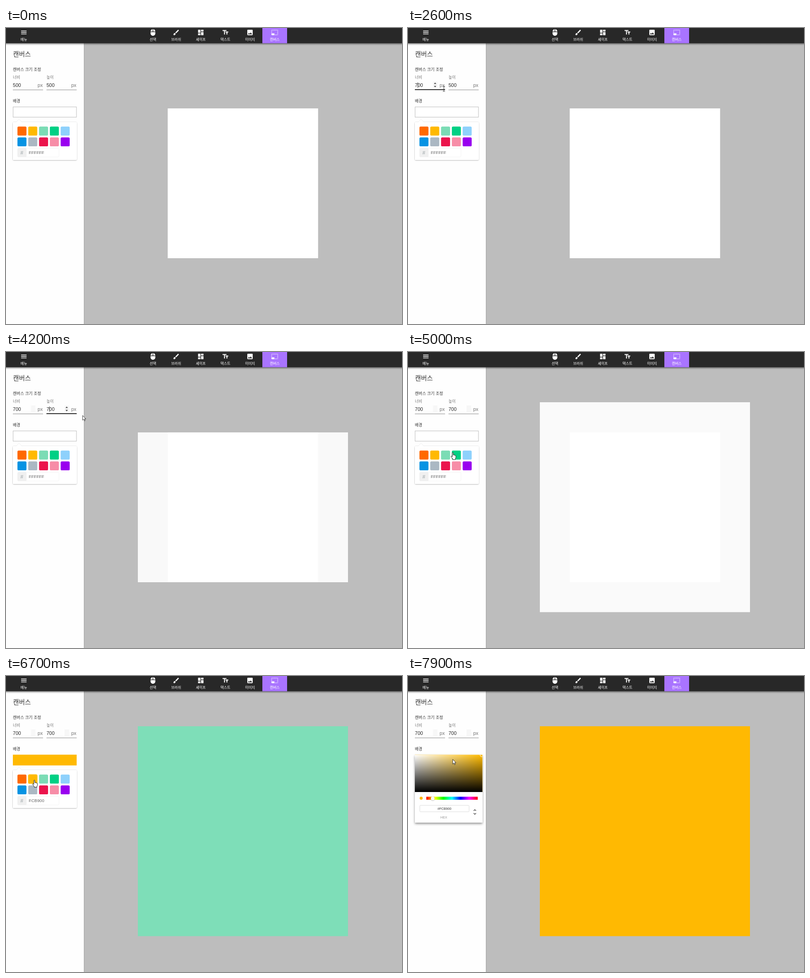
An HTML page that plays this animation: 865 px wide and 648 px high, repeating every 8000 ms.

```html
<!DOCTYPE html>
<html lang="ko">
<head>
<meta charset="utf-8">
<style>
  html, body { margin: 0; width: 100%; height: 100%; overflow: hidden; background: #bdbdbd; }
  svg { display: block; width: 865px; height: 648px; }
  text { font-family: "Liberation Sans", Arial, sans-serif; }
  .ko { font-family: "Noto Sans CJK KR", "Noto Sans CJK", sans-serif; }
</style>
</head>
<body>
<svg id="stage" viewBox="0 0 865 648" xmlns="http://www.w3.org/2000/svg"></svg>
<script>
const LOOP = 8000, STEP = 100;
const MINT = '#7edeb8', GOLD = '#ffb902';

const tools = [
  [39, '메뉴', 'M3 18h18v-2H3v2zm0-5h18v-2H3v2zm0-7v2h18V6H3z'],
  [321, '선택', 'M13 1.07V9h7c0-4.08-3.05-7.44-7-7.93zM4 15c0 4.42 3.58 8 8 8s8-3.58 8-8v-4H4v4zm7-13.93C7.05 1.56 4 4.92 4 9h7V1.07z'],
  [371.7, '브러쉬', 'M7 14c-1.66 0-3 1.34-3 3 0 1.31-1.16 2-2 2 .92 1.22 2.49 2 4 2 2.21 0 4-1.79 4-4 0-1.66-1.34-3-3-3zm13.71-9.37l-1.34-1.34c-.39-.39-1.02-.39-1.41 0L9 12.25 11.75 15l8.96-8.96c.39-.39.39-1.02 0-1.41z'],
  [425.5, '셰이프', 'M3 13h8V3H3v10zm0 8h8v-6H3v6zm10 0h8V11h-8v10zm0-18v6h8V3h-8z'],
  [479.3, '택스트', 'M2.5 4v3h5v12h3V7h5V4h-13zm19 5h-9v3h3v7h3v-7h3V9z'],
  [533, '이미지', 'M21 19V5c0-1.1-.9-2-2-2H5c-1.1 0-2 .9-2 2v14c0 1.1.9 2 2 2h14c1.1 0 2-.9 2-2zM8.5 13.5l2.5 3.01L14.5 12l4.5 6H5l3.5-4.5z'],
  [587, '캔버스', 'M23 15h-2v2h2v-2zm0-4h-2v2h2v-2zm0 8h-2v2c1 0 2-1 2-2zM15 3h-2v2h2V3zm8 4h-2v2h2V7zm-2-4v2h2c0-1-1-2-2-2zM3 21h8v-6H1v4c0 1.1.9 2 2 2zM3 7H1v2h2V7zm12 12h-2v2h2v-2zm4-16h-2v2h2V3zm0 16h-2v2h2v-2zM3 3C2 3 1 4 1 5h2V3zm0 8H1v2h2v-2zm8-8H9v2h2V3zM7 3H5v2h2V3z']
];
const swatches = ['#ff6900', GOLD, '#7bdcb5', '#00d084', '#8ed1fc',
                  '#0693e3', '#abb8c3', '#eb144c', '#f78da7', '#9900ef'];

const rect = (x, y, w, h, fill, more = '') =>
  `<rect x="${x}" y="${y}" width="${w}" height="${h}" fill="${fill}" ${more}/>`;
const text = (x, y, size, fill, s, more = '') =>
  `<text x="${x}" y="${y}" font-size="${size}" fill="${fill}" ${more}>${s}</text>`;
const ko = (x, y, size, fill, s, more = '') => text(x, y, size, fill, s, 'class="ko" ' + more);
const stops = list => list.map((c, i) =>
  `<stop offset="${i / (list.length - 1)}" stop-color="${c}"/>`).join('');

function header() {
  return rect(0, 33, 865, 5, 'url(#drop)') + rect(0, 0, 865, 33.4, '#282828') +
    rect(560, 0, 54, 33.4, '#a974ff') +
    tools.map(([x, name, d]) =>
      `<path d="${d}" fill="#fff" transform="translate(${x - 7.9} 1.9) scale(.656)"/>` +
      ko(x, 28, 7.8, '#fff', name, 'text-anchor="middle" font-weight="500"')).join('');
}

function field(id, x, label) {
  return ko(x, 111.4, 8.6, '#777', label) +
    text(x, 129, 10.6, '#2c2c2c', '500', `id="${id}Text"`) +
    text(x + 54, 129, 10.6, '#757575', 'px') +
    rect(x, 135, 66, 1, '#8c8c8c') +
    rect(x, 134, 66, 1.7, '#222', `id="${id}Line"`) +
    rect(x + 39.5, 117, 10, 15, '#f7f7f7', `id="${id}Spin"`) +
    `<path id="${id}Arrows" d="M${x + 41.5} 122.6h5.4l-2.7-3zM${x + 41.5} 126.8h5.4l-2.7 3z" fill="#444"/>` +
    rect(x + 6.2, 119, .8, 12, '#222', `id="${id}Caret"`);
}

function palette() {
  const tiles = swatches.map((c, i) => {
    const x = 25 + i % 5 * 23.6, y = 215.8 + (i > 4) * 23.6;
    return rect(x, y, 19.7, 19.7, c, `id="glow${i}" rx="2.6" filter="url(#glow)"`) +
      rect(x, y, 19.7, 19.7, c, 'rx="2.6"');
  }).join('');
  return `<g id="palette">
    ${rect(15, 206, 139.5, 83, '#fff', 'rx="2.6" filter="url(#soft)"')}
    <path d="M22.5 206l6-6.5 6 6.5" fill="#fff" stroke="#e8e8e8" stroke-width=".7"/>
    ${rect(15, 206, 139.5, 83, '#fff', 'rx="2.6"')}${tiles}
    ${rect(25.3, 263.3, 90.5, 19, '#fff', 'rx="2.6" stroke="#f2f2f2" stroke-width=".8"')}
    ${rect(25, 263, 19.8, 19.6, '#f0f0f0', 'rx="2.6"')}
    ${text(31.6, 276.6, 11, '#98a1a4', '#')}
    ${text(49.8, 276, 9.2, '#666', 'FFFFFF', 'id="hex"')}
  </g>`;
}

function picker() {
  return `<g id="picker">
    ${rect(15, 172.5, 147.5, 148.5, '#fff', 'rx="1.3" filter="url(#lift)"')}
    ${rect(15, 172.5, 147.5, 148.5, '#fff', 'rx="1.3"')}
    ${['#ffbb00', 'url(#white)', 'url(#black)'].map(f => rect(15, 172.5, 147.5, 81.5, f)).join('')}
    <path d="M157.8 172.6a3.4 3.4 0 0 0 4.6 4" fill="none" stroke="#fff"/>
    <circle cx="28.8" cy="267.6" r="3.3" fill="${GOLD}"/>
    ${rect(40, 264.3, 112.3, 6.6, 'url(#hue)')}
    <circle cx="54" cy="267.9" r="4" fill="#f8f8f8" filter="url(#soft)"/>
    ${rect(25.8, 283.2, 107.6, 14, '#fff', 'rx="1.3" stroke="#d5d5d5" stroke-width=".8"')}
    ${text(79.6, 293, 7.2, '#333', '#FCB900', 'text-anchor="middle"')}
    ${text(78.2, 312.3, 7.2, '#969696', 'HEX', 'text-anchor="middle"')}
    <path d="M143.4 295.2l2.6-2.7 2.6 2.7M143.4 300.2l2.6 2.7 2.6-2.7" fill="none" stroke="#333" stroke-width="1.2"/>
  </g>`;
}

function pointers() {
  return `<g id="pointer">
    <path id="arrow" d="M.3 .4v10.4l2.4-2.2 1.7 3.7 1.6-.7-1.7-3.6h3.2z" fill="#fff" stroke="#111" stroke-width=".8"/>
    <path id="beam" d="M-2.4-5.6h1.6l.8.6.8-.6h1.6M0-5v10M-2.4 5.6h1.6l.8-.6.8.6h1.6" fill="none" stroke="#222" stroke-width=".9"/>
    <path id="hand" d="M-1.2 1.2q0-1.2 1.1-1.2t1.1 1.2v4.2q1.3-.7 2 .4 1.3-.5 1.9.5 1.6-.3 1.6 1.4v2.8q0 2.2-1.2 3.4v1.7h-5.5v-1.4l-3.6-4.8q-.5-1.2.6-1.6 1-.2 2 1.6z" fill="#fff" stroke="#111" stroke-width=".9"/>
  </g>`;
}

const stage = document.getElementById('stage');
stage.innerHTML = `<defs>
  <linearGradient id="drop" x2="0" y2="1"><stop stop-opacity=".42"/><stop offset="1" stop-opacity="0"/></linearGradient>
  <linearGradient id="edge"><stop stop-opacity=".12"/><stop offset="1" stop-opacity="0"/></linearGradient>
  <linearGradient id="white"><stop stop-color="#fff"/><stop offset="1" stop-color="#fff" stop-opacity="0"/></linearGradient>
  <linearGradient id="black" x2="0" y2="1"><stop stop-opacity="0"/><stop offset="1"/></linearGradient>
  <linearGradient id="hue">${stops(['#f00', '#ff0', '#0f0', '#0ff', '#00f', '#f0f', '#f00'])}</linearGradient>
  <filter id="glow" x="-30%" y="-30%" width="160%" height="160%"><feGaussianBlur stdDeviation="1.2"/></filter>
  <filter id="soft" x="-30%" y="-30%" width="160%" height="160%"><feDropShadow dx="0" dy=".6" stdDeviation="1.1" flood-opacity=".36"/></filter>
  <filter id="lift" x="-10%" y="-10%" width="120%" height="125%"><feDropShadow dx="0" dy="2.6" stdDeviation="2.6" flood-opacity=".42"/></filter>
</defs>` +
  rect(0, 0, 865, 648, '#bdbdbd') +
  rect(353.5, 176, 328, 328, '#fff', 'id="board"') +
  rect(353.5, 176, 328, 328, '#fff', 'id="core"') +
  rect(170, 33, 2, 615, 'url(#edge)') + rect(0, 33, 170, 615, '#fefefe') + header() +
  ko(15.2, 61.6, 14.2, '#333', '캔버스', 'font-weight="300"') +
  ko(15, 94.3, 8.8, '#333', '캔버스 크기 조정') +
  field('w', 15, '너비') + field('h', 88.4, '높이') +
  ko(15, 163, 8.8, '#333', '배경') +
  rect(15.5, 172.8, 138.4, 22.4, '#fff', 'id="chip" stroke="#bdbdbd"') +
  palette() + picker() + pointers();

const $ = {};
stage.querySelectorAll('[id]').forEach(n => $[n.id] = n);
const set = (id, props) => { for (const k in props) $[id].setAttribute(k, props[k]); };
const show = (id, on) => set(id, { visibility: on ? 'visible' : 'hidden' });
const within = (t, a, b) => t >= a && t < b;

// time, x, y of the pointer's hot spot
const path = [
  [200, 735, 99], [300, 648, 80], [400, 591, 69], [500, 591, 69],
  [600, 470, 100], [800, 175, 160], [1000, 20, 161], [1100, 3, 157], [1400, 17.5, 128],
  [1800, 17.5, 128], [2700, 86, 134], [3100, 94.7, 125.5], [3600, 94.7, 125.5],
  [4000, 128, 132], [4400, 206, 145], [4500, 206, 145],
  [4800, 132, 202], [5000, 98, 220], [5200, 87, 225], [5700, 87, 225],
  [6000, 63, 229], [6100, 62, 228], [7100, 62, 228], [7400, 88, 198], [7700, 97.4, 182], [LOOP, 97.4, 182]
];

function at(t) {
  let i = 1;
  while (i < path.length - 1 && path[i][0] < t) i++;
  const [a, x, y] = path[i - 1], [b, u, v] = path[i];
  const k = Math.min(1, Math.max(0, (t - a) / (b - a)));
  return [x + (u - x) * k, y + (v - y) * k];
}

function drawField(id, t, f) {
  const focused = within(t, f.focus, f.blur);
  const grow = focused ? Math.min(1, .7 + (t - f.focus) * .003)
    : t >= f.blur ? Math.max(0, .67 - (t - f.blur) * .0034) : 0;
  $[id + 'Text'].textContent = t < f.erase ? '500' : t < f.type ? '00' : '700';
  set(id + 'Line', { x: f.x + 33 * (1 - grow), width: 66 * grow });
  show(id + 'Spin', t >= f.hover);
  show(id + 'Arrows', within(t, f.hover, f.blur));
  show(id + 'Caret', focused && (t - f.focus) % 1000 < 500);
  set(id + 'Caret', { x: within(t, f.erase, f.type) ? f.x : f.x + 6.2 });
}

function render(t) {
  drawField('w', t, { x: 15, hover: 1300, focus: 1400, erase: 1600, type: 1900, blur: 3200 });
  drawField('h', t, { x: 88.4, hover: 2800, focus: 3100, erase: 3300, type: 3700, blur: 4400 });

  const wide = t >= 3100, tall = t >= 4400;
  const fill = t >= 7000 ? GOLD : t >= 6100 ? MINT : tall ? '#fafafa' : wide ? '#f9f9f9' : '#fff';
  set('board', {
    x: wide ? 288 : 353.5, width: wide ? 459 : 328,
    y: tall ? 110 : 176, height: tall ? 459.5 : 328, fill
  });
  show('core', t < 6100);

  const pick = t >= 6700 ? GOLD : t >= 5400 ? MINT : '#fff';
  set('chip', { fill: pick, stroke: pick === '#fff' ? '#bdbdbd' : pick });
  $.hex.textContent = t >= 6700 ? 'FCB900' : t >= 5400 ? '7BDCB5' : 'FFFFFF';
  swatches.forEach((c, i) => show('glow' + i,
    i === 2 && within(t, 5400, 6400) || i === 1 && within(t, 6400, 7700)));

  const open = t >= 7700;
  show('picker', open);
  $.palette.style.display = open ? 'none' : '';

  const [x, y] = at(t);
  const beam = within(t, 1300, 4000), hand = within(t, 4900, 7700);
  set('pointer', { transform: `translate(${x} ${y})` });
  show('beam', beam);
  show('hand', hand);
  show('arrow', t >= 200 && !beam && !hand);
}

const start = performance.now();
function tick() {
  const t = (performance.now() - start) % LOOP;
  render(Math.floor(t / STEP) * STEP);
  requestAnimationFrame(tick);
}
render(0);
requestAnimationFrame(tick);
</script>
</body>
</html>
```
